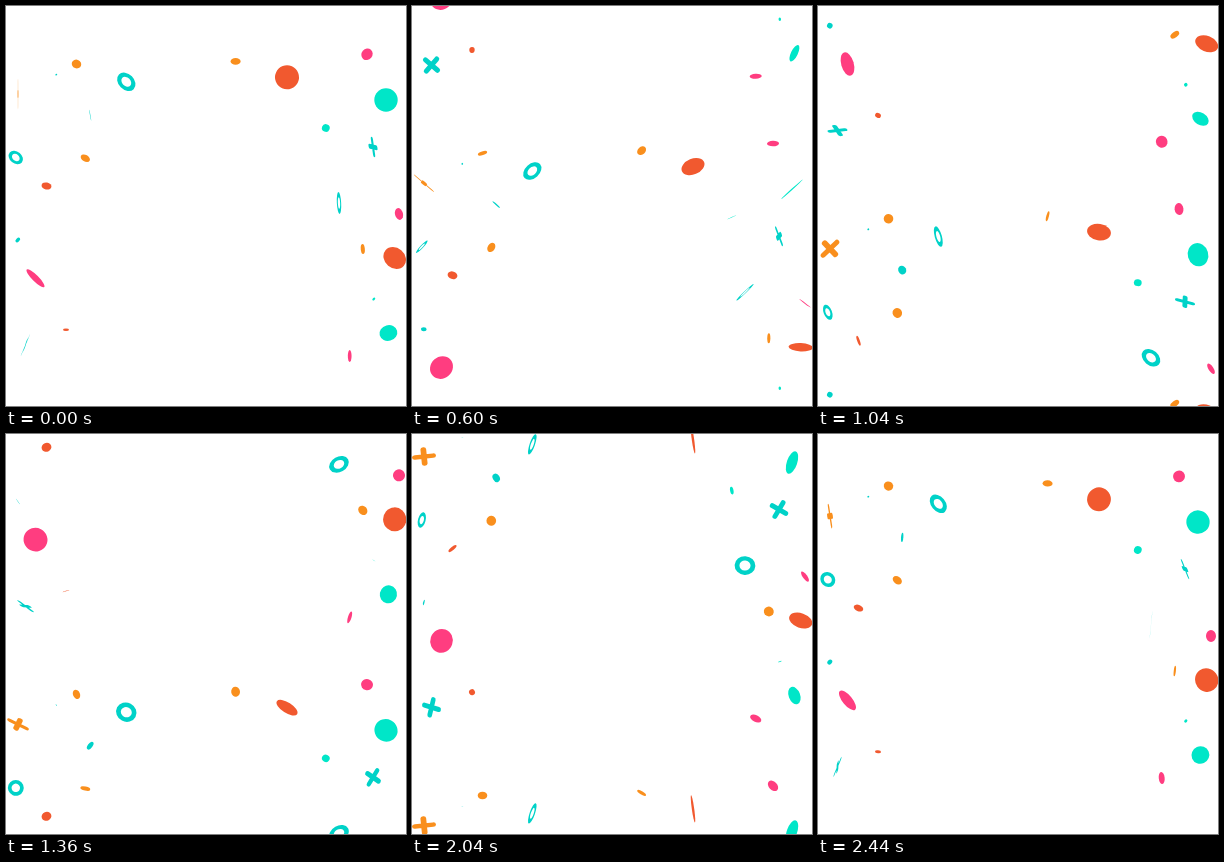
Recreate the animation shown at these times as an HTML page. Size 400 by 400 pixels, loop 2480 ms.

```html
<!DOCTYPE html>
<html lang="en">
<head>
<meta charset="utf-8">
<title>Confetti</title>
<style>
  html, body { margin: 0; width: 100%; height: 100%; overflow: hidden; background: #fff; }
  svg { display: block; width: 100%; height: 100%; }
</style>
</head>
<body>
<svg id="stage" viewBox="0 0 400 400"></svg>
<script>
const LOOP = 2480, STEP = 40, DROP = 369, MARGIN = 15;
const RED = '#f1592f', PINK = '#ff3d80', ORANGE = '#f98f1d';
const TEAL = '#00d2c8', MINT = '#00e6c8';
const stage = document.getElementById('stage');
const pieces = [];

const mod = (a, n) => ((a % n) + n) % n;
const rad = deg => deg * Math.PI / 180;

let seed = 7;
function random(min, max) {
  seed = (seed * 16807) % 2147483647;
  return min + (max - min) * seed / 2147483647;
}

function node(tag, attrs) {
  const el = document.createElementNS('http://www.w3.org/2000/svg', tag);
  for (const name in attrs) el.setAttribute(name, attrs[name]);
  stage.appendChild(el);
  return el;
}

// Every piece starts at (x, y), its long axis at `angle`, tipped by `tilt`;
// it makes `spin` and `tumble` half turns per loop.
function add(tag, attrs, x, y, angle, tilt, spin, tumble, roll = 0) {
  const copies = [node(tag, attrs), node(tag, attrs)];
  pieces.push({ x, y, angle, tilt, spin, tumble, roll, copies });
}

function disc(color, r, ...motion) {
  add('circle', { r, fill: color }, ...motion);
}

function ring(color, r, ...motion) {
  add('circle', { r: r * 0.76, fill: 'none', stroke: color, 'stroke-width': r * 0.46 }, ...motion);
}

function cross(color, r, ...motion) {
  const w = r * 0.48, h = r - w / 2;
  add('path', {
    d: `M${-h} 0H${h}M0 ${-h}V${h}`, stroke: color, 'stroke-width': w, 'stroke-linecap': 'round'
  }, ...motion);
}

function speck(color, r, x, y) {
  disc(color, r, x, y, random(0, 180), random(30, 70), Math.round(random(-4, 4)), Math.round(random(1, 5)));
}

disc(RED, 12, 281, 71.3, 114, 0, 1, 3);
disc(RED, 12, 388.7, 252, 40, 32, -5, 5);
disc(RED, 5, 40.5, 180, 12, -46, -4, 2);
disc(PINK, 12, 29.5, 272.3, 45, 75, -2, 3);
disc(PINK, 6, 361, 48.3, -50, 25, -3, 5);
disc(PINK, 6, 393, 208, 75, 48, -5, 5);
disc(PINK, 6, 343.7, 350, 90, 72, 2, 4);
disc(ORANGE, 4.8, 70.5, 58, 20, 26, -5, 2);
disc(ORANGE, 5, 229.6, 55.4, 0, -46, -1, 2);
disc(ORANGE, 5, 356.8, 243, 85, -66, -4, 4);
disc(ORANGE, 5, 79.3, 152.2, 30, 49, -2, 2);
disc(MINT, 11.7, 380, 94, 45, 0, -2, 2);
disc(MINT, 9, 382.4, 327, -15, 30, 3, 5);
disc(MINT, 3.9, 319.8, 122, 112, 0, 1, 2);
disc(TEAL, 4.5, 84.2, 109.3, 80, 87, -5, 4);

speck(RED, 3, 60, 323.7);
speck(MINT, 1.8, 367.8, 293);
speck(TEAL, 2.8, 11.8, 234);
speck(TEAL, 1, 50.3, 68.6);

ring(TEAL, 10.5, 120.3, 75.8, 45, -41, -2, 2);
ring(TEAL, 10.5, 333, 197, 87, -78, -3, 4);
ring(TEAL, 8, 9.8, 151.5, 40, 41, -2, 5);

cross(TEAL, 10.5, 367, 141, 78, -66, 4, 4, 10);
cross(ORANGE, 12, 12, 88, 90, 88, 3, 4);
cross(TEAL, 10.5, 19.5, 338.8, -68, 87, 1, 2, 25);

// Pieces seen nearly edge-on look longer.
function pose(p, turn) {
  const a = rad(p.angle + p.spin * turn), b = rad(p.roll);
  const width = Math.cos(rad(p.tilt + p.tumble * turn));
  const length = 1 + 0.35 * (1 - Math.abs(width)) ** 8;
  const ca = Math.cos(a), sa = Math.sin(a);
  const column = (u, v) => [ca * length * u - sa * width * v, sa * length * u + ca * width * v];
  return [...column(Math.cos(b), Math.sin(b)), ...column(-Math.sin(b), Math.cos(b))];
}

function render(t) {
  const part = t / LOOP;
  for (const p of pieces) {
    const y = mod(p.y + DROP * part + MARGIN, DROP) - MARGIN;
    const m = pose(p, 180 * part).map(v => v.toFixed(4)).join(' ');
    p.copies.forEach((el, i) => {
      el.setAttribute('transform', `matrix(${m} ${p.x} ${(y + i * DROP).toFixed(3)})`);
    });
  }
}

const start = performance.now();
function tick() {
  const t = mod(performance.now() - start, LOOP);
  render(Math.floor(t / STEP) * STEP);
  requestAnimationFrame(tick);
}
render(0);
requestAnimationFrame(tick);
</script>
</body>
</html>
```
